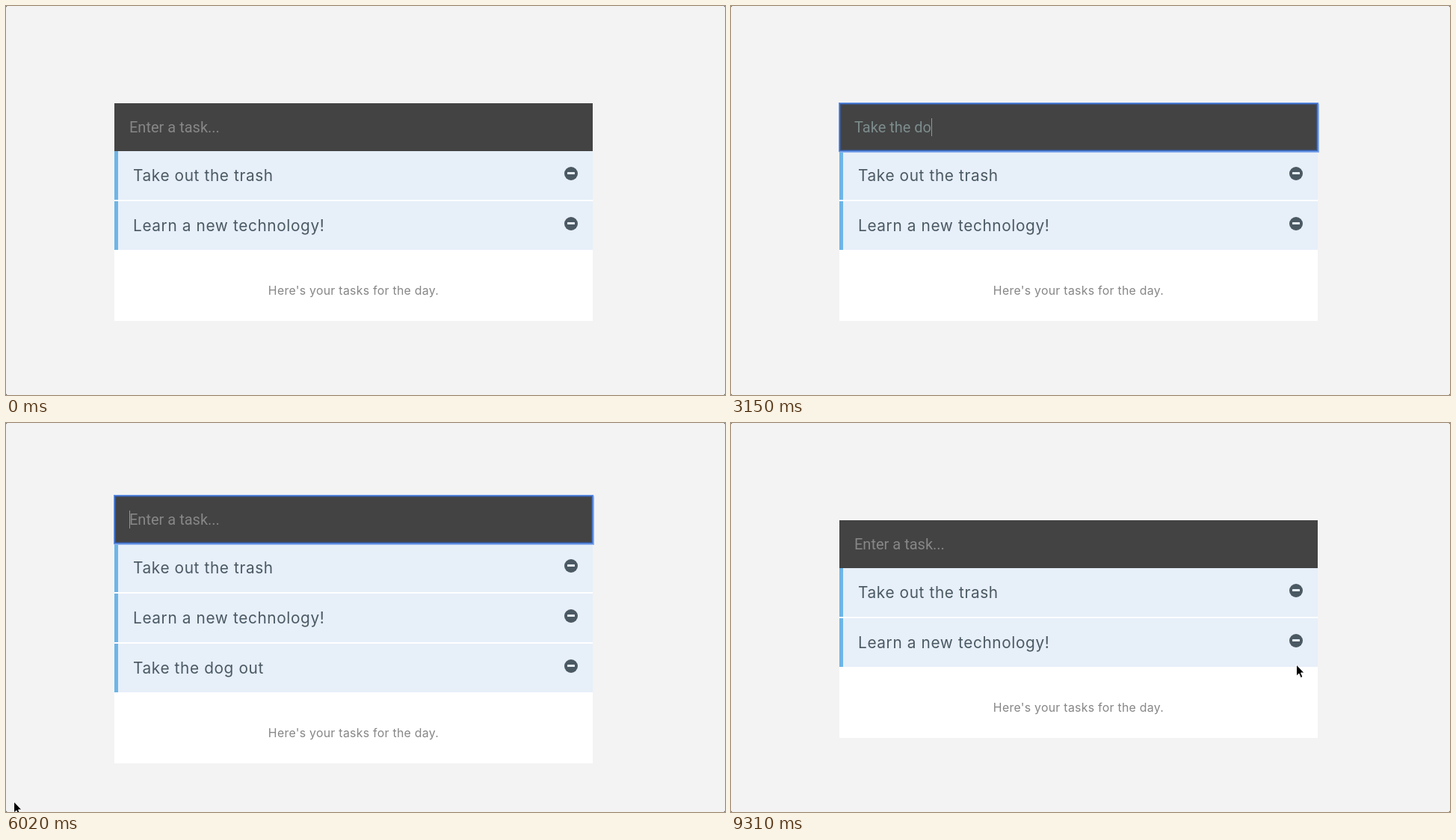
Recreate the animation shown at these times as an HTML page. Size 962x520 px, loop 9380 ms.

```html
<!DOCTYPE html>
<html lang="en">
<head>
<meta charset="utf-8">
<title>Task list</title>
<style>
html, body { margin: 0; width: 100%; height: 100%; overflow: hidden; background: #222; }
#stage {
  position: relative; width: 962px; height: 520px; overflow: hidden;
  background: #f3f3f3; border-radius: 2px;
  font-family: Inter, "Open Sans", sans-serif;
}
#card { position: absolute; left: 145px; width: 640px; background: #fff; }

#field {
  position: relative; z-index: 1; box-sizing: border-box; height: 64px; padding: 20px;
  background: #434343; color: #7d8c8c; white-space: pre;
  font: 20px/25px Roboto, "Liberation Sans", sans-serif;
}
#field.focus {
  box-shadow: 0 0 0 1px #6b98e6, 0 0 1px 1.5px #8fb1ec, inset 0 0 0 1px #3f6fc8, inset 0 0 1px 2px #3c5485;
}
#hint { color: #878787; }
#caret {
  display: inline-block; width: 1px; height: 24px; margin-right: -1px;
  vertical-align: top; background: #8a9a9a;
}

#alert {
  position: absolute; z-index: 2; left: 0; top: 59px; box-sizing: border-box;
  width: 375px; height: 28px; padding: 5px; background: #fdf2d4; color: #8f8a7c;
  font-size: 15.8px; font-weight: 700; line-height: 18px; letter-spacing: .35px; white-space: nowrap;
  animation: bounce .5s backwards paused, bounce .5s reverse forwards paused;
  animation-delay: calc(1260ms - var(--t)), calc(1960ms - var(--t));
}

ul { margin: 0; padding: 0; list-style: none; }
li {
  position: relative; box-sizing: border-box; height: 65px; padding: 20px;
  border-left: 5px solid #6db5e7; background: #e7eff9; color: #4a5963;
  font-size: 20.8px; line-height: 25px; letter-spacing: .62px; white-space: nowrap;
}
li + li { margin-top: 2px; }
li i {
  position: absolute; right: 20px; top: 20.5px; width: 18px; height: 18px;
  border-radius: 50%; background: #4b5963;
}
li i::after {
  content: ""; position: absolute; left: 4px; top: 7.5px; width: 10px; height: 3px;
  border-radius: .5px; background: #e7eff9;
}
#added {
  animation: up 1s cubic-bezier(.215, .61, .355, 1) both paused, down 1s forwards paused;
  animation-delay: calc(4676ms - var(--t)), calc(7860ms - var(--t));
}

#note {
  height: 50px; padding-top: 45px; color: #868686; text-align: center;
  font-size: 15.8px; line-height: 20px; letter-spacing: .3px;
}

#pointer {
  position: absolute; z-index: 5; left: 0; top: 0;
  animation: travel 1720ms both paused;
  animation-delay: calc(5880ms - var(--t));
}
#pointer svg { position: absolute; left: -10px; top: -4px; overflow: visible; }
[hidden] { display: none !important; }

@keyframes bounce {
  0% { transform: scale(0); }
  50% { transform: scale(1.5); }
  100% { transform: scale(1); }
}
@keyframes up {
  0% { opacity: 0; transform: translateY(3000px); }
  60% { opacity: 1; transform: translateY(-20px); }
  75% { transform: translateY(10px); }
  90% { transform: translateY(-5px); }
  100% { transform: none; }
}
@keyframes down {
  0% { transform: none; }
  20% { transform: translateY(10px); }
  40%, 45% { opacity: 1; transform: translateY(-20px); }
  100% { opacity: 0; transform: translateY(2000px); }
}
@keyframes travel {
  0% { transform: translate(2px, 516px); }
  8.1% { transform: translate(11px, 507px); animation-timing-function: ease-in-out; }
  53% { transform: translate(805px, 372px); animation-timing-function: ease-in-out; }
  76% { transform: translate(768px, 332px); animation-timing-function: ease-out; }
  100% { transform: translate(757px, 324px); }
}
</style>
</head>
<body>
<div id="stage">
  <div id="card">
    <div id="field"><span id="typed"></span><span id="caret"></span><span id="hint">Enter a task...</span></div>
    <div id="alert" hidden>The task field must be at least 5 characters.</div>
    <div id="gap"></div>
    <ul>
      <li>Take out the trash<i></i></li>
      <li>Learn a new technology!<i></i></li>
      <li id="added" hidden>Take the dog out<i></i></li>
    </ul>
    <div id="note">Here's your tasks for the day.</div>
  </div>
  <div id="pointer" hidden>
    <svg id="arrow" width="30" height="30" viewBox="-10 -4 30 30">
      <path d="M-.5-1V14.2L2.9 11 5.3 16.6 8 15.4 5.6 10H10Z" fill="#000" stroke="#fff" stroke-width="1" stroke-linejoin="round"/>
    </svg>
    <svg id="hand" width="30" height="30" viewBox="-10 -4 30 30">
      <path d="M-2.8 1.2C-3.4-.9-.6-1.6 0 .4L1.5 5C2.1 3.7 3.8 4 4.1 5.2 4.9 4.3 6.3 4.7 6.5 5.9 7.6 5.4 8.5 6.2 8.6 7.4 8.9 10 8.3 11.4 7.3 13.3V16H.3V14.3C-1.3 13-2.7 11-4.3 9.6-6.2 8-4.7 6.4-3 7.5L-1 8.8Z" fill="#fff" stroke="#111" stroke-width="1.1" stroke-linejoin="round"/>
      <path d="M1.6 9V13M3.7 9V13M5.8 9V13" fill="none" stroke="#111" stroke-width=".9"/>
    </svg>
  </div>
</div>
<script>
const LOOP = 9380;
const TASK = "Take the dog out";
const KEYS = [1260, 1400, 1540, 1750, 1930, 2240, 2380, 2520, 2730, 2940, 3150, 3290, 3500, 3710, 3850, 4060];
const ADD = 4676, REMOVE = 8860, FOCUS = 350, BLUR = 7735;

const $ = id => document.getElementById(id);
const [card, field, typed, caret, hint, alertBox, gap, added, pointer, arrow, hand] =
  ["card", "field", "typed", "caret", "hint", "alert", "gap", "added", "pointer", "arrow", "hand"].map($);
const show = (el, on) => el.toggleAttribute("hidden", !on);
const within = (t, from, to) => t >= from && t < to;

function caretOn(t) {
  if (!within(t, FOCUS, BLUR)) return false;
  if (t < KEYS[0]) return t < 840;
  return t < ADD || (t - ADD) % 1000 < 500;
}

function render(t) {
  const text = t < ADD ? TASK.slice(0, KEYS.filter(k => k <= t).length) : "";
  const error = within(t, 1260, 2460);
  const three = within(t, ADD, REMOVE);
  const overIcon = within(t, 7300, 8750);

  // CSS animations are paused and positioned by --t
  document.documentElement.style.setProperty("--t", t + "ms");
  card.style.top = (error ? 110 : three ? 97 : 130) + "px";
  gap.style.height = error ? "40px" : "0";
  show(alertBox, error);
  show(added, three);

  field.classList.toggle("focus", within(t, FOCUS, BLUR));
  typed.textContent = text;
  show(hint, !text);
  caret.style.visibility = caretOn(t) ? "visible" : "hidden";

  show(pointer, t >= 5880);
  show(arrow, !overIcon);
  show(hand, overIcon);
}

const start = performance.now();
function tick() {
  render((performance.now() - start) % LOOP);
  requestAnimationFrame(tick);
}
tick();
</script>
</body>
</html>
```
